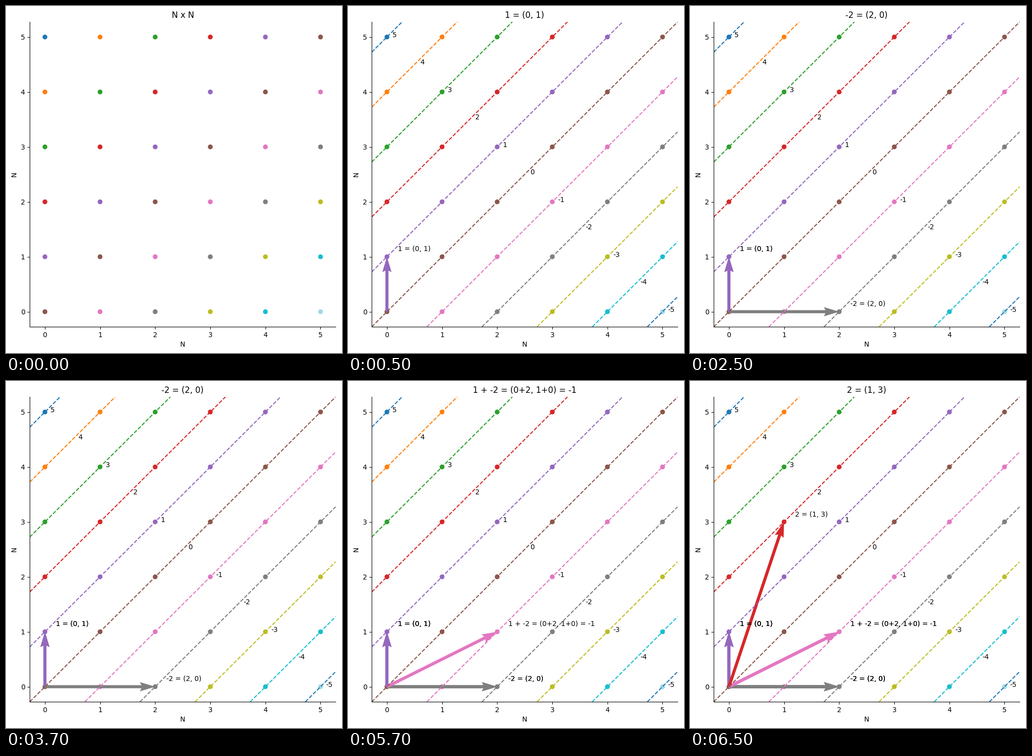
Recreate the animation shown at these times as a matplotlib script. Size 681 by 701 pixels, loop 8000 ms.

```python
import matplotlib.pyplot as plt
from matplotlib.animation import FuncAnimation

WIDTH, HEIGHT, DPI = 681, 701, 100
LEFT, TOP, AX_W, AX_H = 48.2, 32.1, 620, 616
N = 5
LIMITS = (-0.275, N + 0.275)

# Each vector (x, y) stands for the integer y - x.
VECTORS = [
    ((0, 1), "1 = (0, 1)"),
    ((2, 0), "-2 = (2, 0)"),
    ((2, 1), "1 + -2 = (0+2, 1+0) = -1"),
    ((1, 3), "2 = (1, 3)"),
]

plt.rcParams["font.family"] = "DejaVu Sans"
fig = plt.figure(figsize=(WIDTH / DPI, HEIGHT / DPI), dpi=DPI)
ax = fig.add_axes([LEFT / WIDTH, 1 - (TOP + AX_H) / HEIGHT,
                   AX_W / WIDTH, AX_H / HEIGHT])
ax.set(xlim=LIMITS, ylim=LIMITS, xticks=range(N + 1), yticks=range(N + 1),
       xlabel="N", ylabel="N")
ax.spines[["top", "right"]].set_visible(False)
title = ax.set_title("N x N")


def class_color(value):
    return f"C{N - value}"


def draw_points():
    points = [(x, y) for x in range(N + 1) for y in range(N + 1)]
    xs, ys = zip(*points)
    ax.scatter(xs, ys, c=[x - y + N for x, y in points], cmap="tab20")


def draw_classes():
    artists = []
    for i, value in enumerate(range(N, -N - 1, -1)):
        artists.append(ax.axline((0, value), slope=1, linestyle="--",
                                 color=class_color(value)))
        artists.append(ax.text(0.1 + i / 2, N - i / 2, str(value)))
    return artists


def draw_vector(vector, label):
    x, y = vector
    arrow = ax.quiver(0, 0, x, y, angles="xy", scale_units="xy", scale=1,
                      width=0.01, color=class_color(y - x))
    return [arrow, ax.text(x + 0.2, y + 0.1, label)]


draw_points()
layers = []
for step in range(1, len(VECTORS) + 1):
    # Earlier vectors are drawn again on every step, which thickens them.
    layer = draw_classes() if step == 1 else []
    for vector, label in VECTORS[:step]:
        layer += draw_vector(vector, label)
    layers.append(layer)
ax.set(xlim=LIMITS, ylim=LIMITS)


def update(frame):
    step = (frame + 3) // 4
    title.set_text(VECTORS[step - 1][1] if step else "N x N")
    for i, layer in enumerate(layers):
        for artist in layer:
            artist.set_visible(i < step)
    return []


update(0)
anim = FuncAnimation(fig, update, frames=16, interval=500, repeat=True,
                     repeat_delay=0, blit=False)
plt.show()
```
